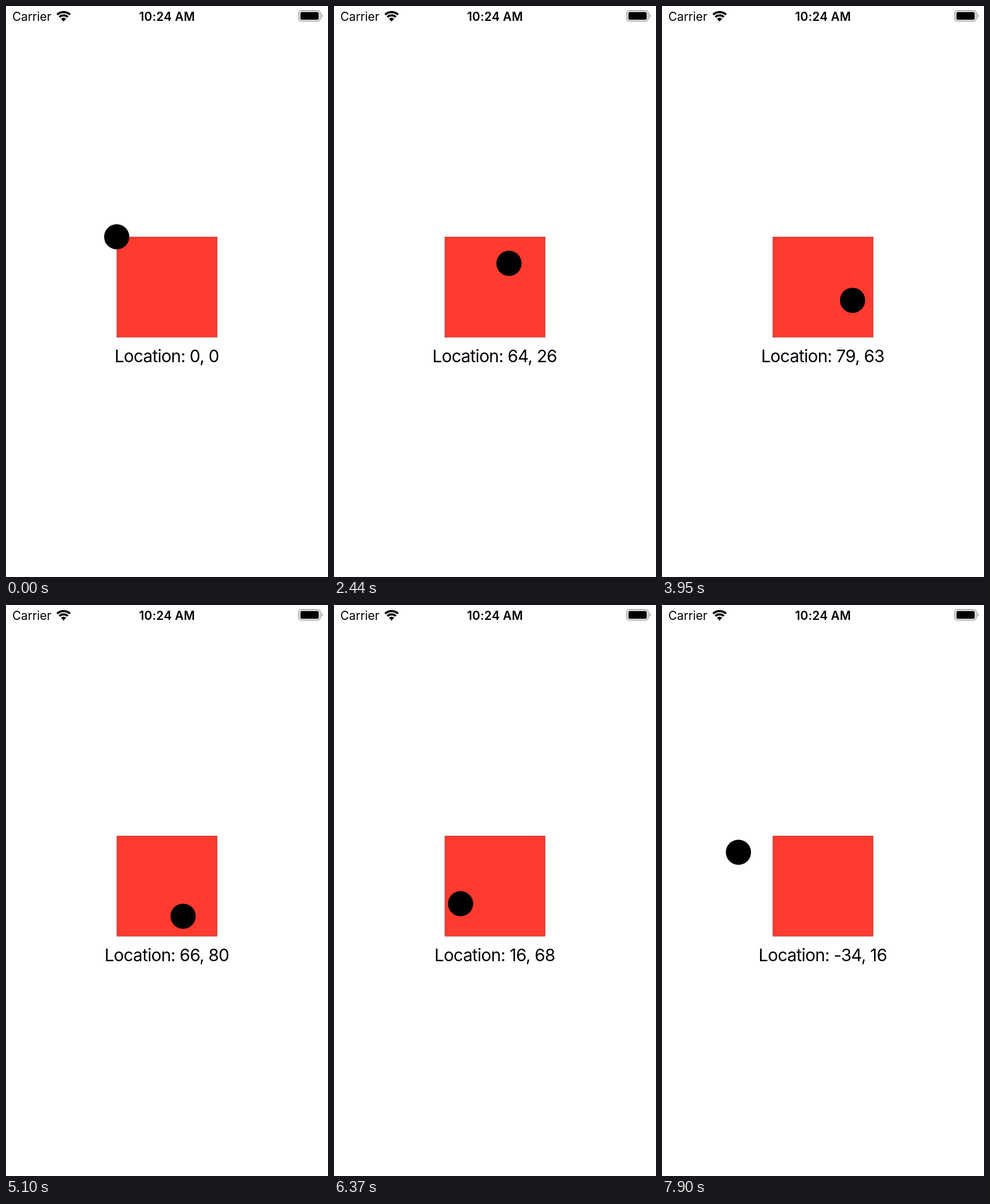
Recreate the animation shown at these times as an HTML page with a canvas. Size 562 by 997 pixels, loop 8000 ms.

```html
<!DOCTYPE html>
<html lang="en">
<head>
<meta charset="utf-8">
<title>Drag location</title>
<style>
  html, body { margin: 0; width: 100%; height: 100%; overflow: hidden; background: #fff; }
  canvas { display: block; width: 562px; height: 997px; }
</style>
</head>
<body>
<canvas id="stage" width="562" height="997"></canvas>
<script>
const ctx = document.getElementById('stage').getContext('2d');
const LOOP = 8000;
const STEP = 88; // about the time between two drag updates, ms
const SCALE = 1.755;
const SIDE = 100 * SCALE;
const LEFT = 193.25, TOP = 403;
const FONT = 'Inter, Roboto, sans-serif';

// Turning points of the drag, in points; rest is the pause after arriving
const path = [
  { t: 0, x: 0, y: 0, rest: 500 },
  { t: 500, x: 17, y: 9.2 },
  { t: 770, x: 25.4, y: 12, rest: 990 },
  { t: 1760, x: 28, y: 10.4, rest: 75 },
  { t: 2440, x: 63.9, y: 26.4 },
  { t: 2640, x: 73.5, y: 27.5 },
  { t: 3950, x: 79.4, y: 63.2 },
  { t: 4380, x: 66, y: 80, rest: 635 },
  { t: 5640, x: 34.4, y: 88.3 },
  { t: 5900, x: 19.2, y: 83.5 },
  { t: 6730, x: 13, y: 54.7 },
  { t: 7000, x: 14, y: 28.9 },
  { t: 7130, x: 12, y: 16.4, rest: 60 },
  { t: 7900, x: -34.1, y: 16.4 }
];

// Moves in even steps from one turning point to the next
function locate(t) {
  const i = path.findLastIndex(p => p.t <= t);
  const a = path[i], b = path[i + 1];
  const start = a.t + (a.rest || 0);
  if (!b || t < start) return a;
  const span = b.t - start;
  const steps = Math.max(1, Math.round(span / STEP));
  const k = Math.floor((t - start) / span * steps) / steps;
  return { x: a.x + (b.x - a.x) * k, y: a.y + (b.y - a.y) * k };
}

function text(str, x, y, size, weight, align, spacing) {
  ctx.font = `${weight} ${size}px ${FONT}`;
  ctx.textAlign = align;
  ctx.letterSpacing = spacing + 'px';
  ctx.fillStyle = '#000';
  ctx.fillText(str, x, y);
}

function box(x, y, w, h, r) {
  ctx.beginPath();
  ctx.roundRect(x, y, w, h, r);
}

function wifi(x, y) {
  const from = -Math.PI / 2 - 0.75, to = -Math.PI / 2 + 0.75;
  ctx.strokeStyle = ctx.fillStyle = '#000';
  ctx.lineWidth = 3.6;
  for (const r of [16.6, 10.8]) {
    ctx.beginPath();
    ctx.arc(x, y, r, from, to);
    ctx.stroke();
  }
  ctx.beginPath();
  ctx.moveTo(x, y);
  ctx.arc(x, y, 6.6, from, to);
  ctx.fill();
}

function battery() {
  ctx.lineWidth = 1.6;
  ctx.strokeStyle = ctx.fillStyle = '#999';
  box(511.2, 8, 37.2, 18.2, 4.5);
  ctx.stroke();
  box(550.7, 13.6, 1.6, 7, [0, 1.6, 1.6, 0]);
  ctx.fill();
  ctx.fillStyle = '#000';
  box(513.8, 10.4, 32, 13.6, 2.5);
  ctx.fill();
}

function draw(t) {
  const { x, y } = locate(t);
  ctx.fillStyle = '#fff';
  ctx.fillRect(0, 0, 562, 997);

  text('Carrier', 11, 25.5, 21, 400, 'left', -0.1);
  text('10:24 AM', 281, 25.5, 21, 600, 'center', 0.15);
  wifi(100.5, 27.2);
  battery();

  ctx.fillStyle = '#ff3b30';
  ctx.fillRect(LEFT, TOP, SIDE, SIDE);
  ctx.strokeStyle = 'rgba(70, 60, 60, 0.5)';
  ctx.lineWidth = 0.8;
  ctx.strokeRect(LEFT + 0.2, TOP + 0.2, SIDE - 0.4, SIDE - 0.4);

  ctx.fillStyle = '#000';
  ctx.beginPath();
  ctx.arc(LEFT + x * SCALE, TOP + y * SCALE, 22, 0, Math.PI * 2);
  ctx.fill();

  text(`Location: ${Math.round(x)}, ${Math.round(y)}`, 280.5, 621.5, 29.8, 400, 'center', -0.7);
}

const begin = performance.now();
function tick() {
  draw((performance.now() - begin) % LOOP);
  requestAnimationFrame(tick);
}
tick();
</script>
</body>
</html>
```
